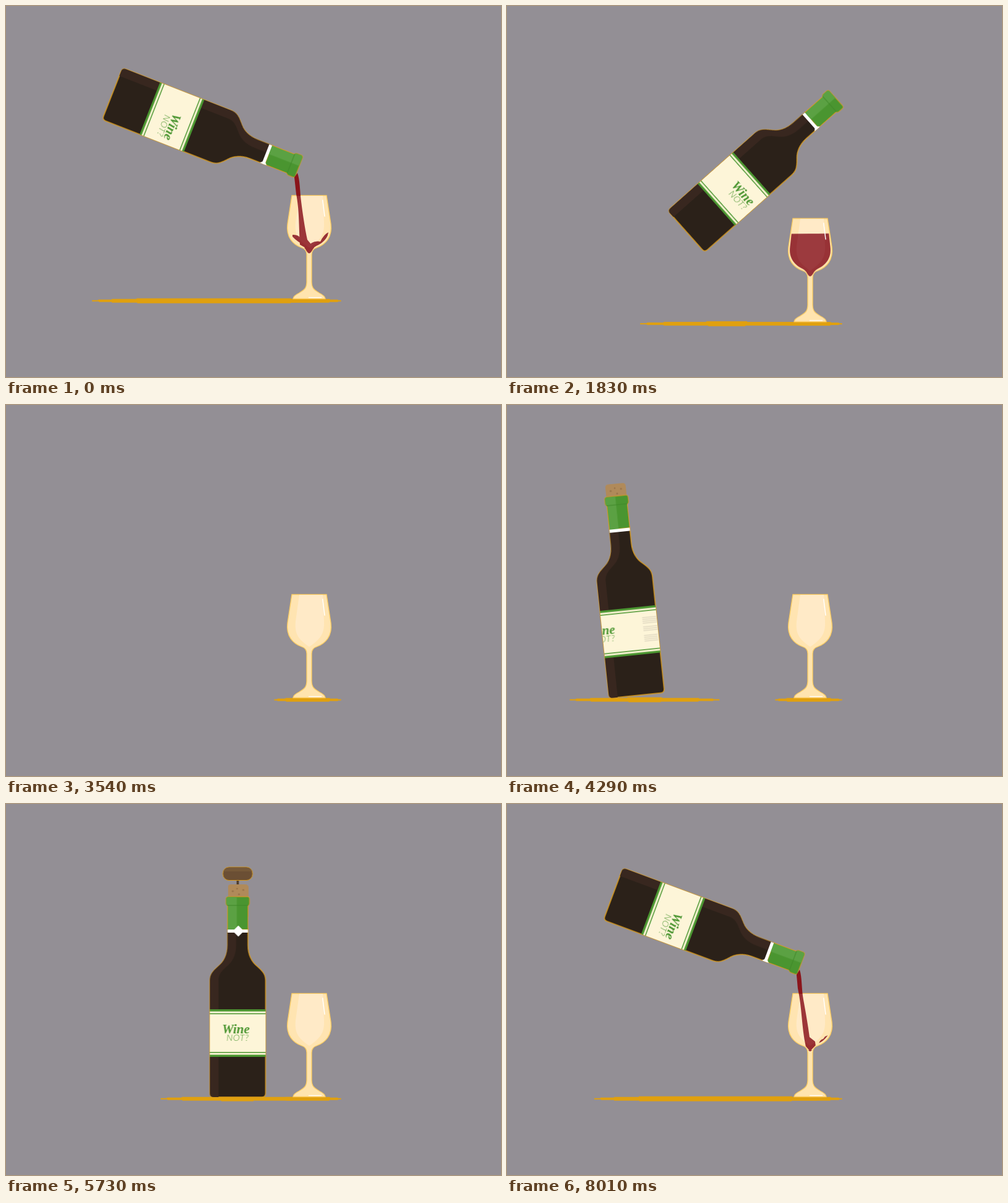
Recreate the animation shown at these times as an HTML page without scripts. Size 800 px wide and 600 px high, loop 8040 ms.

```html
<!DOCTYPE html>
<html lang="en">
<head>
<meta charset="utf-8">
<title>Wine not?</title>
<style>
html, body { margin: 0; width: 100%; height: 100%; overflow: hidden; background: #938f95; }
svg { display: block; width: 800px; height: 600px; }
.a { animation: 8.04s linear infinite; }
.step { animation-timing-function: step-end; }

/* the whole set sinks away, then is dressed again */
.scene { animation-name: scene; }
@keyframes scene {
  0%, 10% { transform: translateY(0); }
  12.44% { transform: translateY(1px); }
  14.93% { transform: translateY(3.6px); }
  17.41% { transform: translateY(9px); }
  20.15% { transform: translateY(20px); }
  22.76% { transform: translateY(37px); }
  25.5% { transform: translateY(66px); }
  28.23% { transform: translateY(110px); }
  30.97% { transform: translateY(172px); }
  33.58% { transform: translateY(254px); }
  36.07% { transform: translateY(355px); }
  38.06% { transform: translateY(460px); }
  38.07%, 61.6% { transform: translateY(0); }
  62.3% { transform: translateY(5px); }
  63.7%, 78.4% { transform: translateY(0); }
  80.2% { transform: translateY(3px); }
  81% { transform: translateY(0); }
  81.7% { transform: translateY(5px); }
  83.1%, 100% { transform: translateY(0); }
}

.bottle { animation-name: bottle; }
@keyframes bottle {
  0%, 100% { transform: translate(322.7px, 201px) rotate(111.4deg); }
  5.22% { transform: translate(324px, 197.5px) rotate(114deg); }
  10.45% { transform: translate(324px, 201px) rotate(111.2deg); }
  14.3% { transform: translate(345px, 205px) rotate(101deg); }
  17.41% { transform: translate(390px, 212px) rotate(80deg); }
  20.4% { transform: translate(411px, 217px) rotate(62deg); }
  22.76% { transform: translate(410.7px, 219.7px) rotate(48.5deg); }
  26.74% { transform: translate(397px, 255px) rotate(20deg); }
  30.47% { transform: translate(377px, 308px) rotate(2deg); }
  31.72% { transform: translate(374px, 313px) rotate(-2deg); }
  33.58% { transform: translate(372.2px, 313.5px) rotate(-1deg); }
  36.07%, 38.06% { transform: translate(374.5px, 312px) rotate(0deg); }
  38.07%, 43.5% { transform: translate(-150px, 308px) rotate(-6deg); }
  50.75% { transform: translate(100px, 308.5px) rotate(-6deg); }
  53.36% { transform: translate(192.7px, 308.5px) rotate(-5.9deg); }
  56.72% { transform: translate(305px, 308.5px) rotate(-5.5deg); }
  58.7% { transform: translate(363px, 312px) rotate(0deg); }
  59.6% { transform: translate(376px, 309.6px) rotate(3deg); }
  60.45%, 83.7% { transform: translate(374.5px, 312px) rotate(0deg); }
  87.06% { transform: translate(376px, 304px) rotate(2deg); }
  89.18% { transform: translate(379.7px, 291px) rotate(9.6deg); }
  90.8% { transform: translate(374px, 275px) rotate(26deg); }
  93.28% { transform: translate(355px, 232px) rotate(68deg); }
  95.77% { transform: translate(330px, 208px) rotate(100deg); }
  97.64% { transform: translate(325px, 204px) rotate(107.5deg); }
  99.63% { transform: translate(323.5px, 202px) rotate(110.4deg); }
}

.shade { animation-name: shade; }
@keyframes shade {
  0%, 100% { transform: translateX(336px) scale(1.98, 1.25); }
  5.22% { transform: translateX(330px) scale(2.09, 1.25); }
  10.45% { transform: translateX(338px) scale(1.88, 1.2); }
  20.4% { transform: translateX(352px) scale(1.52, 1.05); }
  22.76% { transform: translateX(355px) scale(1.42, 1); }
  30.47%, 38.06% { transform: translateX(374px) scale(1.25, 1); }
  38.07%, 43.5% { transform: translateX(-150px) scale(1.22, 1); }
  50.75% { transform: translateX(128px) scale(1.22, 1); }
  53.36% { transform: translateX(222px) scale(1.22, 1); }
  56.72% { transform: translateX(325px) scale(1.23, 1); }
  60.45%, 83.7% { transform: translateX(374px) scale(1.25, 1); }
  89.18% { transform: translateX(327px) scale(1.42, 1); }
  90.8% { transform: translateX(327px) scale(1.49, 1.05); }
  93.28% { transform: translateX(330px) scale(1.65, 1.1); }
  97% { transform: translateX(335px) scale(1.85, 1.2); }
  99.63% { transform: translateX(337px) scale(1.97, 1.25); }
}

/* the bottle turns about its own axis */
.print { animation-name: print; }
@keyframes print {
  0%, 38.06% { transform: translateX(18px); }
  38.07%, 43.5% { transform: translateX(-230px); }
  53.36% { transform: translateX(-43.5px); }
  60.45%, 83.7% { transform: translateX(0); }
  89.18% { transform: translateX(7px); }
  94.5%, 100% { transform: translateX(18px); }
}
.seal { animation-name: seal; }
@keyframes seal {
  0%, 38.06% { transform: translateX(20px); }
  38.07%, 53.36% { transform: translateX(-40px); }
  60.45%, 83.7% { transform: translateX(1px); }
  89.18% { transform: translateX(7px); }
  94.5%, 100% { transform: translateX(20px); }
}

.pull { animation-name: pull; }
@keyframes pull {
  0%, 72.2% { transform: translateY(0); }
  74.6%, 76.5% { transform: translateY(-8px); }
  80.6%, 81% { transform: translateY(-37px); }
  83.4%, 100% { transform: translateY(-340px); }
}
.corked { animation-name: corked; }
@keyframes corked {
  0% { visibility: hidden; }
  38.07% { visibility: visible; }
  83.3%, 100% { visibility: hidden; }
}
.screw { animation-name: screw; }
@keyframes screw {
  0%, 58.5% { transform: translateY(-220px); }
  62.2% { transform: translateY(-37px); }
  70.3%, 100% { transform: translateY(0); }
}
.grip { animation-name: grip; }
@keyframes grip {
  0%, 62.2%, 64.9%, 67.6%, 70.3%, 100% { transform: scaleX(1); }
  63.55%, 66.25%, 68.95% { transform: scaleX(.45); }
}

.glass { animation-name: drop; }
@keyframes drop {
  0%, 38.06% { transform: translateY(0); }
  38.07% { transform: translateY(-480px); }
  40.67% { transform: translateY(-170px); }
  41.9% { transform: translateY(0); }
  42.6% { transform: translateY(-5px); }
  43.3%, 100% { transform: translateY(0); }
}
.spot { animation-name: spot; }
@keyframes spot {
  0%, 38.06% { transform: translateX(487.5px) scaleX(1); }
  38.07%, 39.5% { transform: translateX(487.5px) scaleX(0); }
  42%, 100% { transform: translateX(487.5px) scaleX(1); }
}

.fill { animation-name: fill; }
@keyframes fill {
  0% { transform: translateY(391px); }
  2% { transform: translateY(384px) rotate(1deg); }
  5% { transform: translateY(364px) rotate(-1deg); }
  9% { transform: translateY(345px) rotate(1deg); }
  12.44% { transform: translateY(333px) rotate(-.5deg); }
  14%, 38.06% { transform: translateY(331px); }
  38.07%, 98.2% { transform: translateY(425px); }
  100% { transform: translateY(391px); }
}
.stream { animation-name: stream; }
@keyframes stream {
  0%, 11.2% { transform: translateY(0) scaleY(1); }
  13% { transform: translateY(400px) scaleY(0); }
  13.01%, 97% { transform: translateY(270px) scaleY(0); }
  98.6%, 100% { transform: translateY(0) scaleY(1); }
}
.splash { animation-name: splash; }
@keyframes splash {
  0% { visibility: visible; }
  1.8%, 99.8% { visibility: hidden; }
  99.9%, 100% { visibility: visible; }
}
.drip { animation-name: drip; }
@keyframes drip {
  0%, 99% { visibility: hidden; }
  99.2%, 99.8% { visibility: visible; }
  99.9%, 100% { visibility: hidden; }
}
.fizz { animation-name: fizz; }
@keyframes fizz {
  0%, 81.9% { transform: translate(407px, 140px) scale(.3); opacity: 0; }
  82% { transform: translate(380px, 140px) scale(.3); opacity: 1; }
  89.18% { transform: translate(407px, 110px) scale(1); opacity: 1; }
  90% { transform: translate(408px, 108px) scale(1); opacity: 1; }
  90.1%, 100% { transform: translate(408px, 108px) scale(1); opacity: 0; }
}

.wine { font: italic bold 21px "Liberation Serif", serif; }
.not { font: italic 300 14.5px Lato, sans-serif; letter-spacing: .7px; }
</style>
</head>
<body>
<svg viewBox="0 0 800 600">
  <defs>
    <path id="body" d="M-39 162Q-45 162 -45 156V-26C-45 -36 -41 -41 -32 -49C-22 -57 -16.5 -68 -16.5 -84V-110H16.5V-84C16.5 -68 22 -57 32 -49C41 -41 45 -36 45 -26V156Q45 162 39 162Z"/>
    <path id="bowl" d="M462.5 307H517.5L522.5 352C525 372 514 382 502 388C495 391 494 400 490 400C486 400 485 391 478 388C466 382 455 372 457.5 352Z"/>
    <path id="inner" d="M474 307H512L514 350C515 372 506 380 490 391C474 380 466 372 468 350Z"/>
    <clipPath id="inBody"><use href="#body"/></clipPath>
    <clipPath id="inBowl"><use href="#bowl"/></clipPath>
    <clipPath id="inNeck"><rect x="-17" y="-125" width="34" height="40"/></clipPath>
  </defs>

  <g class="a scene">
    <g fill="#e0a00f" shape-rendering="crispEdges">
      <g transform="translate(0 476.7)"><ellipse class="a shade" rx="100" ry="3.6"/></g>
      <g transform="translate(0 476.8)"><ellipse class="a spot" rx="55" ry="3.3"/></g>
    </g>

    <g class="a bottle">
      <g class="a step corked">
        <g class="a pull">
          <g class="a screw">
            <rect x="-1.7" y="-190" width="3.4" height="48" fill="#4a3722"/>
            <g class="a grip">
              <rect x="-24" y="-210" width="48" height="21.5" rx="10" fill="#6b4f34" stroke="#d99a1a"/>
              <path d="M-23 -203Q-21 -209.5 -14 -209.5H14Q21 -209.5 23 -203Z" fill="#765939"/>
            </g>
          </g>
          <path d="M-16 -177Q-16 -182 -11 -182H12Q17 -182 17 -177V-130H-16Z" fill="#b08a5a"/>
          <g fill="#97734a">
            <circle cx="-8" cy="-171" r="1.6"/><circle cx="-1" cy="-175" r="1.3"/>
            <circle cx="9" cy="-173" r="1.5"/><circle cx="2" cy="-166" r="1.5"/>
            <circle cx="-10" cy="-155" r="1.6"/><circle cx="8" cy="-150" r="1.5"/>
          </g>
        </g>
      </g>

      <use href="#body" fill="#2b2119" stroke="#d99a1a" stroke-width="1.4"/>
      <g clip-path="url(#inBody)">
        <path d="M-50 162H-31V-26C-31 -36 -27 -41 -18 -49C-8 -57 -2.5 -68 -2.5 -84V-110H-50Z" fill="#38271f"/>
        <rect x="-46" y="20" width="92" height="77" fill="#fdf5d8"/>
        <path d="M-46 21.8H46M-46 95.2H46" stroke="#4a9530" stroke-width="3.6"/>
        <path d="M-46 27.2H46M-46 89.8H46" stroke="#4a9530" stroke-width="1.5"/>
        <g class="a print">
          <g fill="#4a9530" text-anchor="middle">
            <text class="wine" x="-3" y="58.5">Wine</text>
            <text class="not" x="0" y="71">NOT?</text>
          </g>
          <path d="M65 38h25m-25 3h25m-25 3h25m-25 3h25M65 53h25m-25 3h25m-25 3h25M65 67h22m-22 3h22m-22 3h22m-22 3h22" fill="none" stroke="#d3cbb5" stroke-width="1.2"/>
        </g>
      </g>

      <path d="M-16.5 -109V-148H-17Q-19 -148 -19 -151V-159Q-19 -162 -16 -162H16Q19 -162 19 -159V-151Q19 -148 17 -148H16.5V-109Z" fill="#4a9530" stroke="#d99a1a"/>
      <path d="M-16 -109V-148Q-18.5 -148 -18.5 -151V-159Q-18.5 -161.5 -16 -161.5H-1.5V-109Z" fill="#5ba143"/>
      <path d="M-17 -148H17" stroke="#3f8729"/>
      <rect x="-16.5" y="-109" width="33" height="5" fill="#fff"/>
      <g clip-path="url(#inNeck)">
        <path class="a seal" d="M0 -115.5L9 -106.5L0 -97.5L-9 -106.5Z" fill="#fff"/>
      </g>
    </g>

    <g class="a glass">
      <path d="M462 306.5H518L525 352C528 374 516 386 502 391C496 393 494 397 494 402V446C494 458 500 460 506 464C512 467 516 470 516 473.5H464C464 470 468 467 474 464C480 460 486 458 486 446V402C486 397 484 393 478 391C464 386 452 374 455 352Z" fill="#ffe4ae" stroke="#fbcb62" stroke-width="1.3"/>
      <use href="#inner" fill="#ffeac4"/>
      <g fill="#8a1a22">
        <g clip-path="url(#inBowl)">
          <path class="a fill" d="M430 1Q465 0 490 0T550 -1V110H430Z"/>
          <path class="a step splash" d="M463 370Q472 369 477 376L488 383 486 389Q470 381 463 373ZM484 392Q495 378 508 381Q514 369 521 366Q520 379 506 387Q498 387 491 400Z"/>
          <path class="a step drip" d="M504 387Q506 381 511 380L514 376 519 374Q515 383 508 385Z"/>
        </g>
        <g class="a stream">
          <path fill="#8a151b" d="M466 277L471 270C475 280 475 300 477 316S483 360 487 378L492 384 490 398 482 390 475 386C473 350 474 330 469 304Z">
            <animate attributeName="d" dur="8.04s" repeatCount="indefinite" keyTimes="0;.03;.06;.09;.12;.97;.9963;1"
              values="M466 277L471 270C475 280 475 300 477 316S483 360 487 378L492 384 490 398 482 390 475 386C473 350 474 330 469 304Z;
              M468 276L473 268C477 280 476 300 479 316S487 360 489 377L498 384 499 390 490 400 483 392C476 360 477 330 470 298Z;
              M466 277L471 270C475 280 475 300 477 316S483 360 487 378L492 384 490 398 482 390 475 386C473 350 474 330 469 304Z;
              M468 276L473 268C477 280 476 300 479 316S487 360 489 377L498 384 499 390 490 400 483 392C476 360 477 330 470 298Z;
              M466 277L471 270C475 280 475 300 477 316S483 360 487 378L492 384 490 398 482 390 475 386C473 350 474 330 469 304Z;
              M468 276L473 268C477 280 476 300 479 316S487 360 489 377L498 384 499 390 490 400 483 392C476 360 477 330 470 298Z;
              M468 276L473 268C477 280 476 300 479 316S487 360 489 377L498 384 499 390 490 400 483 392C476 360 477 330 470 298Z;
              M466 277L471 270C475 280 475 300 477 316S483 360 487 378L492 384 490 398 482 390 475 386C473 350 474 330 469 304Z"/>
          </path>
        </g>
      </g>
      <!-- glass in front of the wine -->
      <use href="#bowl" fill="#ffe6cc" opacity=".12"/>
      <use href="#inner" fill="#fff" opacity=".04"/>
      <path d="M511.8 314L515 340" stroke="#fff" stroke-width="1.5" stroke-linecap="round"/>
      <path d="M489 471.5H510" stroke="#fff" stroke-width="1.3"/>
    </g>

    <g class="a fizz">
      <path d="M-5 -10h2m13 6h2" stroke="#e0a00f" stroke-width="1.5"/>
      <path d="M-11 5h1.5m12.5 6h1.5" stroke="#fff" stroke-width="1.5"/>
    </g>
  </g>
</svg>
</body>
</html>
```
